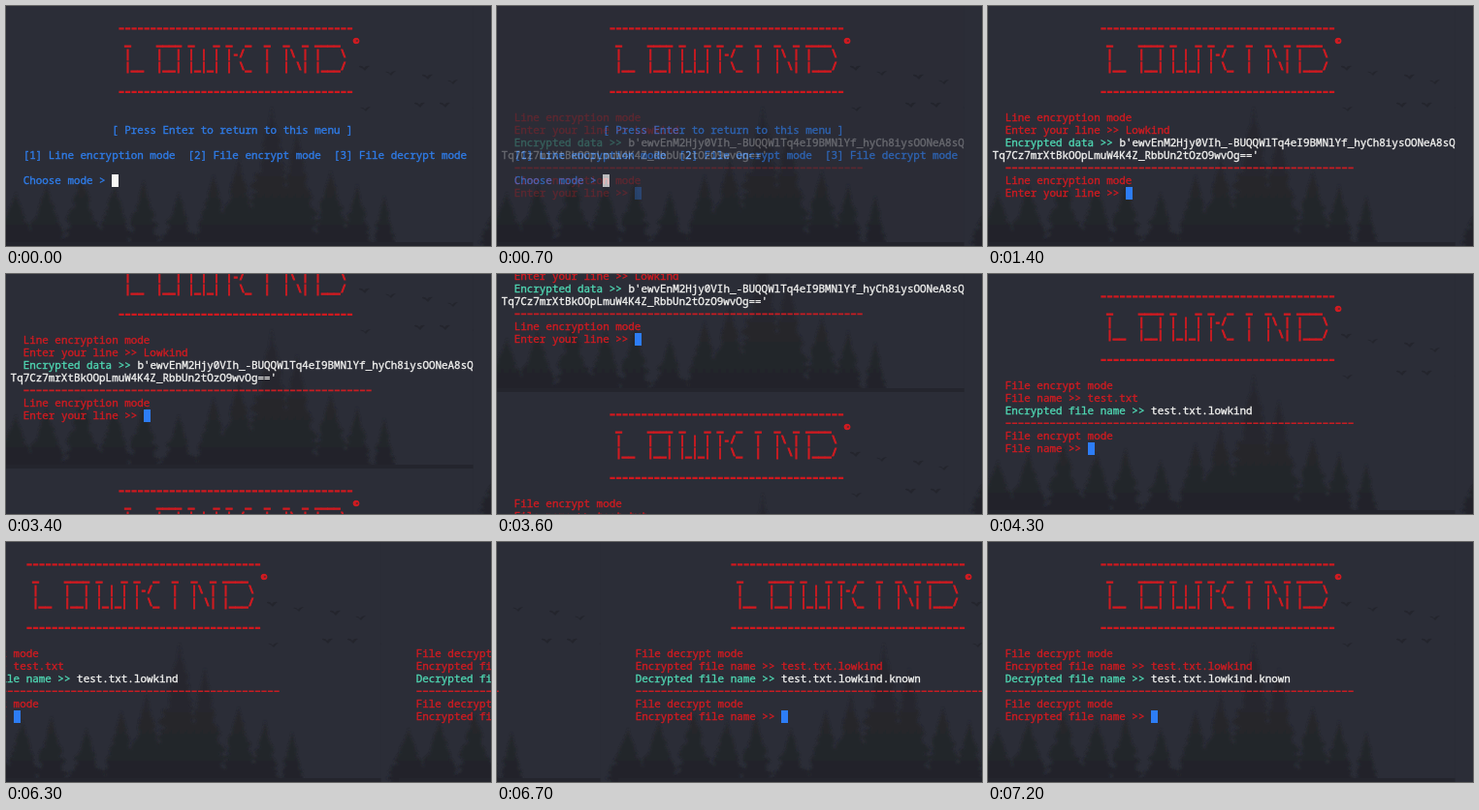
An HTML page for the animation above (8000 ms loop, 500 by 248 pixels).

```html
<!DOCTYPE html>
<html lang="en">
<head>
<meta charset="utf-8">
<title>Terminal menu tour</title>
<style>
  html, body { margin: 0; width: 100%; height: 100%; overflow: hidden; background: #2b2d37; }
  svg { display: block; width: 500px; height: 248px; }
  text { font: 500 10.9px "Noto Sans Mono", "DejaVu Sans Mono", monospace; white-space: pre; stroke-width: .35; }
  .red { fill: #d01b21; stroke: #d01b21; }
  .blue { fill: #2f7ce8; stroke: #2f7ce8; }
  .teal { fill: #4fd6b2; stroke: #4fd6b2; }
  .white { fill: #f1f1ef; stroke: #f1f1ef; }
  .art { font-weight: 700; stroke-width: .8; }
  .cursor { fill: #2d7df6; }
  .block { fill: #f8f8f6; }
  .rule { stroke: #c81c22; stroke-width: 1.6; stroke-dasharray: 5.3 1.24; }
  .thick { stroke: #d0181e; stroke-width: 2.2; }
</style>
</head>
<body>
<svg viewBox="0 0 500 248">
  <defs>
    <linearGradient id="wood" gradientUnits="userSpaceOnUse" x1="0" y1="100" x2="0" y2="248">
      <stop offset="0" stop-color="#282931"/>
      <stop offset=".6" stop-color="#25262c"/>
      <stop offset="1" stop-color="#232429"/>
    </linearGradient>
    <filter id="soft"><feGaussianBlur stdDeviation="1.1"/></filter>
    <g id="back"></g>
    <g id="banner"></g>
  </defs>
  <g id="menu"></g>
  <g id="line"></g>
  <g id="encrypt"></g>
  <g id="decrypt"></g>
</svg>
<script>
const W = 500, H = 248, CELL = 6.54, ROW = 13.1;
const $ = id => document.getElementById(id);
const colX = col => 4.6 + col * CELL;
const rowY = row => 23.3 + row * ROW;

// Terminal parts, placed by column and row
const put = (col, row, str, cls) =>
  `<text x="${colX(col)}" y="${rowY(row) + 3.7}" class="${cls}">${str}</text>`;
const rule = (col, row, count, cls = "") => {
  const x = colX(col) + 0.6;
  return `<path class="rule ${cls}" d="M${x} ${rowY(row)}h${count * CELL - 1.2}"/>`;
};
const cursor = (col, row, cls) =>
  `<rect x="${Math.round(colX(col))}" y="${Math.round(rowY(row) - 6.5)}" width="7" height="13" class="${cls}"/>`;

// Backdrop: a soft line of firs and a flock of birds
let seed = 7;
const rand = () => (seed = seed * 16807 % 2147483647) / 2147483647;

function fir(x, top, spread) {
  const left = [], right = [];
  for (let y = top; y < H + 6; y += 3) {
    const half = 1 + (y - top) * spread;
    left.unshift(`${(x - half * (0.6 + rand() * 0.5)).toFixed(1)} ${y}`);
    right.push(`${(x + half * (0.6 + rand() * 0.5)).toFixed(1)} ${y + 1}`);
  }
  return `M${x} ${top - 4}L${right.join("L")}L${left.join("L")}Z`;
}

const bird = ([x, y], i) =>
  `M${x - 5} ${y - 2 + i % 3}q3 -1 5 2q2 -3 6 -${2 + i % 2}q-3 2 -5 5q-2 -3 -6 -4z`;

const firs = [[10, 196, .45], [42, 188, .4], [78, 178, .35], [112, 188, .36], [142, 184, .32],
  [178, 196, .4], [214, 178, .3], [240, 160, .28], [274, 108, .25], [300, 134, .25],
  [335, 174, .32], [362, 188, .3], [390, 200, .28]];
const birds = [[369, 64], [396, 69], [434, 71], [460, 79], [426, 101], [485, 105],
  [452, 102], [370, 106], [490, 88]];

$("back").innerHTML =
  `<rect width="${W}" height="${H}" fill="#2b2d37"/>` +
  `<path fill="url(#wood)" filter="url(#soft)" d="${firs.map(f => fir(...f)).join("")}"/>` +
  `<path fill="#24252d" d="${birds.map(bird).join("")}"/>` +
  `<rect y="244" width="${W}" height="4" fill="#24252d"/>`;

const art = [
  "_    ____ _   _ _  _  _  _  _ ____",
  "|    |  | | | | |-/   |  |\\ | |   \\",
  "|__  |__| |_|_| | \\_  |  | \\| |___/"
];
$("banner").innerHTML = rule(17, 0, 37, "thick") + rule(17, 5, 37, "thick") +
  art.map((s, i) => put(18, i + 1, s, "red art")).join("") + put(54, 1, "©", "red art");

// Scenes, each clipped to the stage so the firs end at its edge
const scene = (id, ...parts) => {
  $(id).style.clipPath = `path("M0 0H${W}V${H}H0Z")`;
  $(id).innerHTML = `<use href="#back"/><use href="#banner"/>` + parts.join("");
};

scene("menu",
  put(16, 8, "[ Press Enter to return to this menu ]", "blue"),
  put(2, 10, "[1] Line encryption mode  [2] File encrypt mode  [3] File decrypt mode", "blue"),
  put(2, 12, "Choose mode &gt; ", "blue"),
  cursor(16, 12, "block"));

scene("line",
  put(2, 7, "Line encryption mode", "red"),
  put(2, 8, "Enter your line &gt;&gt; Lowkind", "red"),
  put(2, 9, "Encrypted data &gt;&gt;", "teal"),
  put(20, 9, "b'ewvEnM2Hjy0VIh_-BUQQWlTq4eI9BMNlYf_hyCh8iysOONeA8sQX", "white"),
  put(0, 10, "Tq7Cz7mrXtBkOOpLmuW4K4Z_RbbUn2tOzO9wvOg=='", "white"),
  rule(2, 11, 55),
  put(2, 12, "Line encryption mode", "red"),
  put(2, 13, "Enter your line &gt;&gt;", "red"),
  cursor(21, 13, "cursor"));

const fileScene = (id, title, ask, input, reply, output) => scene(id,
  put(2, 7, title, "red"),
  put(2, 8, `${ask} &gt;&gt; ${input}`, "red"),
  put(2, 9, `${reply} &gt;&gt;`, "teal"),
  put(25, 9, output, "white"),
  rule(2, 10, 55),
  put(2, 11, title, "red"),
  put(2, 12, `${ask} &gt;&gt;`, "red"),
  cursor(ask.length + 6, 12, "cursor"));

fileScene("encrypt", "File encrypt mode", "File name", "test.txt",
  "Encrypted file name", "test.txt.lowkind");
fileScene("decrypt", "File decrypt mode", "Encrypted file name", "test.txt.lowkind",
  "Decrypted file name", "test.txt.lowkind.known");

// Transitions run in ten steps of 100 ms
const progress = (t, start) =>
  t < start ? 0 : Math.min(10, Math.floor((t - start) / 100) + 1) / 10;
const easeOut = p => 1 - (1 - p) ** 2;
const move = (id, x, y) => $(id).setAttribute("transform", `translate(${x} ${y})`);

function draw(t) {
  const fade = progress(t, 500);
  const up = Math.round(easeOut(progress(t, 3400)) * H);
  const across = Math.round(easeOut(progress(t, 6300)) * W);
  $("line").setAttribute("opacity", fade);
  move("menu", 0, -up);
  move("line", 0, -up);
  move("encrypt", -across, H - up);
  move("decrypt", W - across, 0);
}

function tick() {
  draw(performance.now() % 8000);
  requestAnimationFrame(tick);
}
tick();
</script>
</body>
</html>
```
